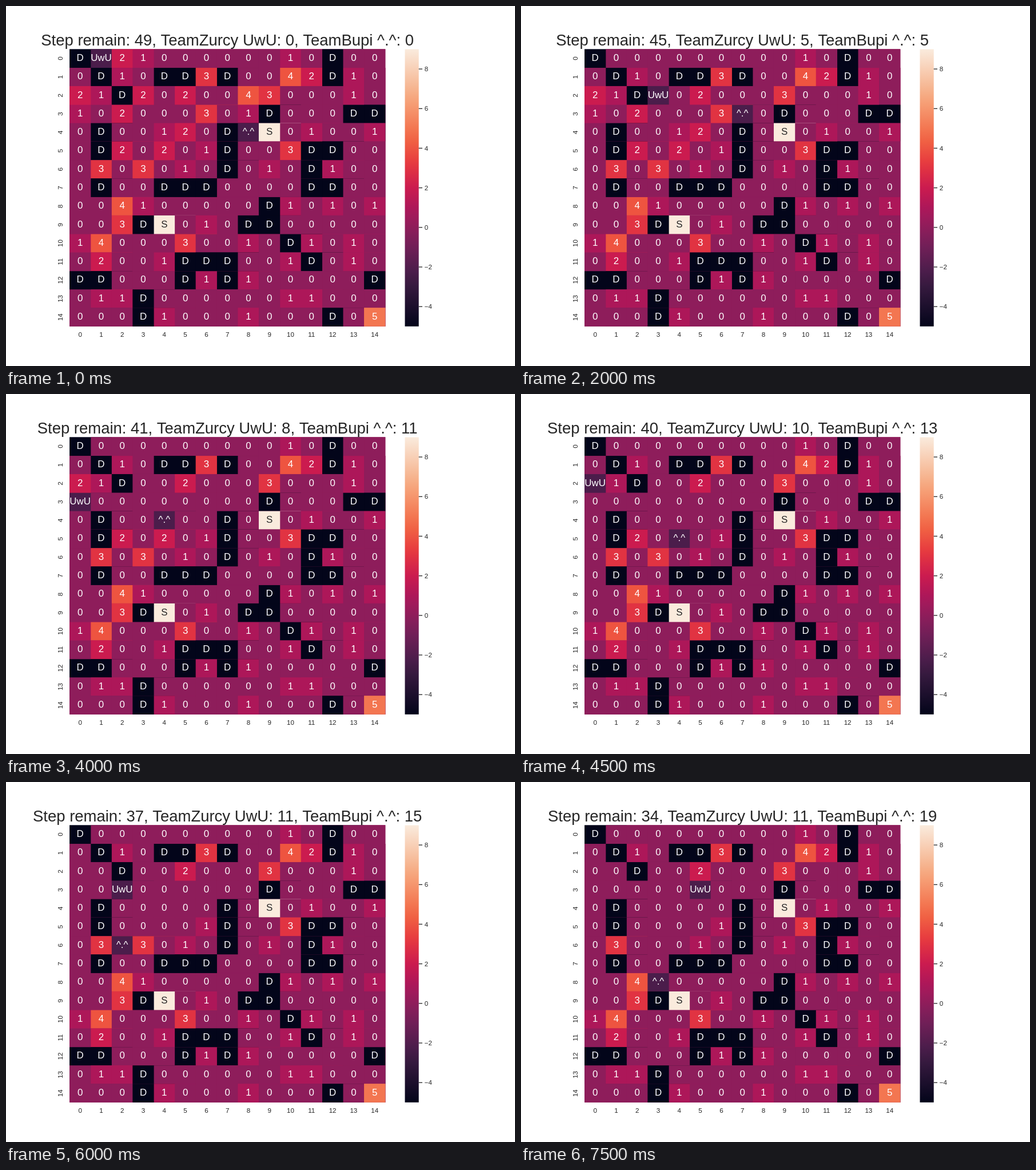
An HTML page with a canvas for the animation above (8 s loop, 890 px wide and 629 px high).

```html
<!DOCTYPE html>
<html lang="en">
<head>
<meta charset="utf-8">
<title>Grid game</title>
<style>
html, body { margin: 0; width: 100%; height: 100%; overflow: hidden; background: #fff; }
canvas { display: block; }
</style>
</head>
<body>
<canvas id="stage" width="890" height="629"></canvas>
<script>
const ctx = document.getElementById('stage').getContext('2d');
const STEP_MS = 500, STEPS = 16, SIZE = 15;
const LEFT = 111.25, TOP = 75.48, WIDTH = 551.8, HEIGHT = 484.33;
const CELL_W = WIDTH / SIZE, CELL_H = HEIGHT / SIZE;
const PLOT_SCALE = 890 / 1170; // the chart is laid out on a finer pixel grid
const INK = '#262626';

// D = wall, S = special cell, digits = points
const START = [
  'D02100000010D00', '0D10DD3D0042D10', '21D202004300010', '102000301D000DD',
  '0D00120D0S01001', '0D20201D003DD00', '0303010D010D100', '0D00DDD0000DD00',
  '004100000D10101', '003DS010DD00000', '1400030010D1010', '02001DDD001D010',
  'DD000D1D100000D', '011D00000011000', '000D10001000D05'
];
const FILL = {
  D: '#03051a', S: '#faebdd', 0: '#8e1d5b', 1: '#ad1759', 2: '#cb1b4f',
  3: '#e13342', 4: '#ee5440', 5: '#f37651', player: '#4b1d4b'
};
const PLAYERS = [
  { team: 'TeamZurcy', face: 'UwU', row: 0, col: 1, moves: 'RRDDDLLLURDRRRR' },
  { team: 'TeamBupi', face: '^.^', row: 4, col: 8, moves: 'UUDLLDLLDLLDRDD' }
];
const MOVE = { U: [-1, 0], D: [1, 0], L: [0, -1], R: [0, 1] };

// Replays the game up to the given step
function play(step) {
  const grid = START.map(row => [...row]);
  const players = PLAYERS.map(({ team, face, row, col, moves }) => {
    let score = 0;
    for (const m of moves.slice(0, step)) {
      row += MOVE[m][0];
      col += MOVE[m][1];
      score += +grid[row][col];
      grid[row][col] = '0';
    }
    return { team, face, row, col, score };
  });
  for (const p of players) grid[p.row][p.col] = p.face;
  return { grid, players };
}

function text(str, x, y, size, color = INK, align = 'center') {
  ctx.font = `${size}px "Liberation Sans", Arial, sans-serif`;
  ctx.textAlign = align;
  ctx.fillStyle = color;
  ctx.fillText(str, x, y);
}

const snap = v => Math.round(v / PLOT_SCALE) * PLOT_SCALE;
const edgeX = col => snap(LEFT + col * CELL_W);
const edgeY = row => snap(TOP + row * CELL_H);

// Each cell runs on to the far edges, so later cells blend over it without seams
function fillCell(value, row, col) {
  const x = edgeX(col), y = edgeY(row);
  ctx.fillStyle = FILL[value] || FILL.player;
  ctx.fillRect(x, y, edgeX(Math.min(col + 2, SIZE)) - x, edgeY(Math.min(row + 2, SIZE)) - y);
}

function labelCell(value, row, col) {
  text(value, LEFT + (col + 0.5) * CELL_W, TOP + (row + 0.5) * CELL_H + 4.4, 16.9,
    value === 'S' ? INK : '#fff');
}

function drawAxes() {
  for (let i = 0; i < SIZE; i++) {
    text(i, LEFT + (i + 0.5) * CELL_W, 578.3, 11.62);
    ctx.save();
    ctx.translate(98.8, TOP + (i + 0.5) * CELL_H);
    ctx.rotate(-Math.PI / 2);
    text(i, 0, 0, 11.62);
    ctx.restore();
  }
}

const ramp = ctx.createLinearGradient(0, TOP + HEIGHT, 0, TOP);
[[0, '#03051a'], [1 / 7, '#35193e'], [0.2, '#4c1d4b'], [2 / 7, '#701f57'], [1 / 3, '#841e5a'],
 [0.4, '#a11a5b'], [3 / 7, '#ad1759'], [0.5, '#cb1b4f'], [4 / 7, '#e13342'], [0.6, '#e83f3f'],
 [2 / 3, '#f06043'], [5 / 7, '#f37651'], [0.8, '#f69c73'], [5 / 6, '#f6aa82'],
 [6 / 7, '#f6b48f'], [1, '#faebdd']].forEach(([at, color]) => ramp.addColorStop(at, color));

function drawColorBar() {
  ctx.fillStyle = ramp;
  ctx.fillRect(697.5, 75.5, 24.2, 484.3);
  for (let v = -4; v <= 8; v += 2) {
    const y = TOP + HEIGHT * (9 - v) / 14;
    ctx.fillStyle = INK;
    ctx.fillRect(721.7, y - 0.65, 6.3, 1.3);
    text(v < 0 ? '\u2212' + -v : v, 731.8, y + 4.2, 11.62, INK, 'left');
  }
}

function draw(step) {
  const { grid, players } = play(step);
  const eachCell = paint =>
    grid.forEach((line, row) => line.forEach((value, col) => paint(value, row, col)));
  ctx.fillStyle = '#fff';
  ctx.fillRect(0, 0, 890, 629);
  eachCell(fillCell);
  eachCell(labelCell);
  drawAxes();
  drawColorBar();
  const scores = players.map(p => `${p.team} ${p.face}: ${p.score}`).join(', ');
  text(`Step remain: ${49 - step}, ${scores}`, LEFT + WIDTH / 2, 69.2, 27.47);
}

const begin = performance.now();
let shown = -1;
function tick() {
  const step = Math.floor((performance.now() - begin) / STEP_MS) % STEPS;
  if (step !== shown) draw(shown = step);
  requestAnimationFrame(tick);
}
tick();
</script>
</body>
</html>
```
